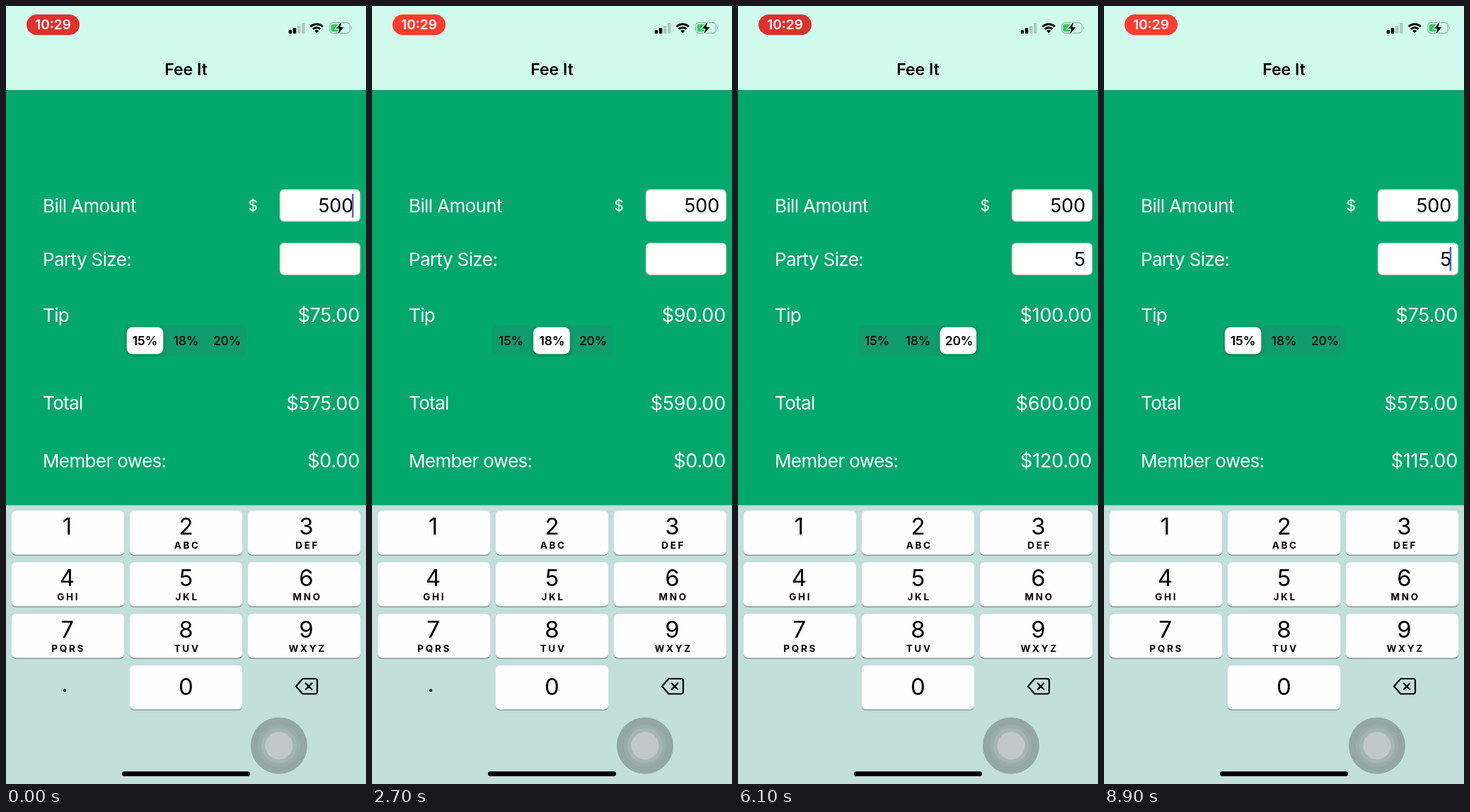
An HTML page for the animation above (9 s loop, 509 by 1101 pixels).

```html
<!DOCTYPE html>
<html lang="en">
<head>
<meta charset="utf-8">
<title>Tip calculator</title>
<style>
  html, body { margin: 0; height: 100%; overflow: hidden; }
  svg { display: block; width: 100vw; height: 100vh; font-family: Inter, Roboto, sans-serif; }
  .label { font-size: 26px; fill: #fff; letter-spacing: -.62px; }
  .amount { font-size: 27px; text-anchor: end; letter-spacing: -.2px; }
  .money { fill: #fff; }
  .field { fill: #fff; stroke: #c9d3cf; stroke-width: 1.4; }
  .rate { font-size: 17.5px; font-weight: 500; text-anchor: middle; letter-spacing: -.1px; }
  .digit { font-size: 33px; text-anchor: middle; }
  .letters { font-size: 13.5px; font-weight: 700; text-anchor: middle; letter-spacing: 2.7px; }
  .caret { fill: #4263ca; }
  .line { fill: none; stroke: #000; stroke-linejoin: round; stroke-linecap: round; }
</style>
</head>
<body>
<svg viewBox="0 0 509 1101">
  <rect width="509" height="1101" fill="#02a86d"/>
  <rect width="509" height="119" fill="#d0fbec"/>
  <rect y="119" width="509" height="1" fill="#078f60"/>

  <rect id="pill" x="29" y="12" width="75" height="29" rx="14.5"/>
  <text x="66.5" y="33.3" text-anchor="middle" font-size="19" font-weight="600" fill="#fff">10:29</text>
  <g id="signal"></g>
  <g class="line" stroke-width="3" style="stroke-linecap:butt">
    <path d="M430.7 29.2a12.2 12.2 0 0 1 17.2 0M434 32.7a7.5 7.5 0 0 1 10.6 0"/>
    <path d="M439.3 38.3l-3-3.1a4.3 4.3 0 0 1 6 0z" fill="#000" stroke="none"/>
  </g>
  <rect x="457.7" y="23.7" width="28.6" height="14.6" rx="4.5" fill="none" stroke="#92b3a7" stroke-width="1.3"/>
  <path d="M488 28.5q2.4 2.5 0 5z" fill="#92b3a7"/>
  <rect x="459.7" y="25.7" width="11" height="10.6" rx="2.5" fill="#35c75a"/>
  <path d="M474.5 22.5l-8 9.5h5l-2 7.500 8-9.500h-5z" stroke="#d0fbec" stroke-width="2.4" paint-order="stroke"/>
  <text x="254.500" y="98" text-anchor="middle" font-size="23" font-weight="600">Fee It</text>

  <g class="label">
    <text x="52" y="291.500">Bill Amount</text>
    <text x="52" y="367.500">Party Size:</text>
    <text x="52" y="446.500">Tip</text>
    <text x="52" y="571">Total</text>
    <text x="52" y="652.500">Member owes:</text>
    <text x="342.500" y="290" font-size="21" style="font-size:21px">$</text>
  </g>
  <rect class="field" x="387.500" y="260" width="113" height="44.500" rx="5.500"/>
  <rect class="field" x="387.500" y="335.700" width="113" height="44.500" rx="5.500"/>
  <g class="amount">
    <text x="491" y="292">500</text>
    <text id="party" x="491" y="368">5</text>
    <g class="money">
      <text id="tip" x="500" y="446.500"></text>
      <text id="total" x="500" y="571.500"></text>
      <text id="owes" x="500" y="653"></text>
    </g>
  </g>
  <rect id="billCaret" class="caret" x="489" y="265.500" width="2.500" height="34" rx="1.200"/>
  <rect id="partyCaret" class="caret" x="488.700" y="341" width="2.500" height="34" rx="1.200"/>

  <rect x="169" y="452" width="172" height="43" rx="9" fill="#109d6d"/>
  <rect id="thumb" y="454.500" width="51.500" height="38" rx="8" fill="#fff" style="filter:drop-shadow(0 2px 3px #0003)"/>
  <g id="rates"></g>

  <rect y="706.500" width="509" height="395" fill="#c2dfda"/>
  <g id="keys"></g>
  <circle id="point" cx="83" cy="968.700" r="2.100"/>
  <path class="line" stroke-width="2.200" d="M419.500 952h17.500q3 0 3 3v15.500q0 3-3 3h-17.500l-9.500-10.700zM423.700 958.500l8.600 8.600m0-8.600l-8.600 8.600"/>

  <circle cx="386" cy="1046.700" r="40" fill="#93a8a5"/>
  <circle cx="386" cy="1046.700" r="30" fill="#9aadaa"/>
  <circle cx="386" cy="1046.700" r="25" fill="#a5b5b2"/>
  <circle cx="386" cy="1046.700" r="19.500" fill="#bfc9c7"/>
  <rect x="164" y="1083.300" width="181" height="6.700" rx="3.300"/>
</svg>
<script>
const LOOP = 9000, STEP = 100, BILL = 500;
const FOCUS_PARTY = 4900, TYPE_PARTY = 5700;
const rates = [15, 18, 20];
// [time of the tap, chosen segment]
const taps = [[-1000, 0], [1400, 1], [2800, 2], [7200, 1], [8400, 0]];

const $ = id => document.getElementById(id);
const clamp = v => Math.max(0, Math.min(1, v));
const money = v => '$' + v.toFixed(2);
const wave = (t, peak, period) => Math.cos(2 * Math.PI * (t - peak) / period);
const thumbX = i => 170.8 + 57.4 * i;

$('signal').innerHTML = [34, 31, 28, 24].map((y, i) =>
  `<rect x="${399.700 + 6.100 * i}" y="${y}" width="4.500" height="${39 - y}" rx="1"/>`).join('');

$('rates').innerHTML = rates.map((r, i) =>
  `<text class="rate" x="${196.500 + 58 * i}" y="479.800">${r}%</text>`).join('');

const letters = ['', 'ABC', 'DEF', 'GHI', 'JKL', 'MNO', 'PQRS', 'TUV', 'WXYZ'];
const textX = [86.500, 254.500, 424.500];
function key(digit, col, row, sub) {
  const x = 8 + 167 * col, y = 714.300 + 73 * row;
  return `<rect x="${x}" y="${y + 1.500}" width="159" height="62.300" rx="6" fill="#84999a"/>
    <rect x="${x}" y="${y}" width="159" height="62.300" rx="6" fill="#fefefe"/>
    <text class="digit" x="${textX[col]}" y="${y + (digit ? 33.700 : 41.700)}">${digit}</text>
    <text class="letters" x="${textX[col] + 1.700}" y="${y + 53.300}">${sub}</text>`;
}
$('keys').innerHTML = letters.map((s, i) => key(i + 1, i % 3, Math.floor(i / 3), s)).join('') + key(0, 1, 3, '');

function draw(t) {
  const n = taps.findLastIndex(tap => t >= tap[0]);
  const [start, choice] = taps[n];
  const from = n ? taps[n - 1][1] : choice;
  const eased = 1 - (1 - clamp((t - start) / 400)) ** 3;
  $('thumb').setAttribute('x', thumbX(from + (choice - from) * eased));
  [...$('rates').children].forEach((el, i) => el.style.fontWeight = i === choice ? 600 : 500);

  const typed = t >= TYPE_PARTY, inParty = t >= FOCUS_PARTY;
  const tip = BILL * rates[choice] / 100;
  $('tip').textContent = money(tip);
  $('total').textContent = money(BILL + tip);
  $('owes').textContent = money(typed ? (BILL + tip) / 5 : 0);
  $('party').style.opacity = typed ? 1 : 0;
  $('point').style.opacity = inParty ? 0 : 1;

  const blink = peak => clamp(.5 + 1.500 * wave(t, peak, 1000));
  $('billCaret').style.opacity = inParty ? 0 : blink(200);
  $('partyCaret').style.opacity = typed ? blink(5813) : inParty ? 1 : 0;

  const glow = clamp(.5 + 2 * wave(t, 1100, 2000));
  $('pill').setAttribute('fill', `rgb(${221 + 33 * glow},${50 + 9 * glow},${46 + 3 * glow})`);
  const bars = t >= 7000 && t < 8400 ? 1 : 2;
  [...$('signal').children].forEach((el, i) => el.setAttribute('fill', i < bars ? '#000' : '#a8cdbf'));
}

function tick() {
  draw(Math.floor(performance.now() % LOOP / STEP) * STEP);
  requestAnimationFrame(tick);
}
tick();
</script>
</body>
</html>
```
